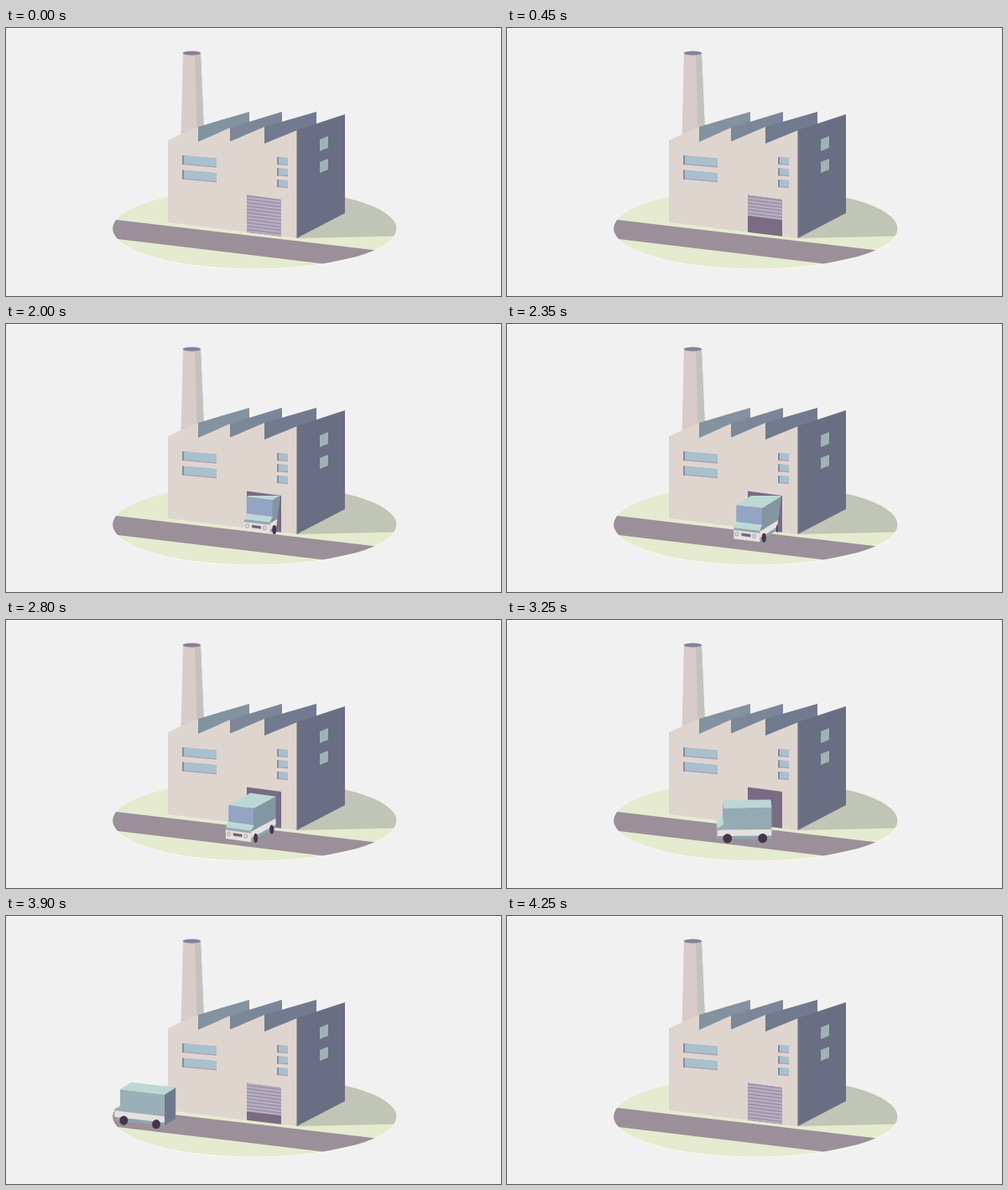
Write an HTML page that moves like this. It is 590 px wide and 320 px high and loops after 4550 ms.

```html
<!DOCTYPE html>
<html lang="en">
<head>
<meta charset="utf-8">
<title>Factory delivery</title>
<style>
  html, body { margin: 0; width: 100%; height: 100%; overflow: hidden; background: #f1f1f1; }
  svg { display: block; width: 590px; height: 320px; }
</style>
</head>
<body>
<svg viewBox="0 0 590 320">
  <defs>
    <clipPath id="island"><ellipse cx="296.3" cy="239.5" rx="169.2" ry="48"/></clipPath>
    <clipPath id="doorway"><path d="M287 199.5 328 205V248.7L287 243.8Z"/></clipPath>
    <clipPath id="leaving"><path d="M0 205H327L322.5 240V320H0Z"/></clipPath>
    <clipPath id="roadEnd"><path d="M127 0H590V320H127Z"/></clipPath>
  </defs>

  <ellipse cx="296.3" cy="239.8" rx="169.6" ry="48.5" fill="#fbfbf6"/>
  <g clip-path="url(#island)">
    <path d="M120 180H480V300H120Z" fill="#e5ebcf"/>
    <path d="M347 251 470 248.5V180H390Z" fill="#c1c5b5"/>
    <path d="M110 226.6 450 266.4 378 281.5 110 249.2Z" fill="#9b8f99"/>
  </g>

  <path d="M211 30H232L236 122 208.5 130Z" fill="#d8cccb"/>
  <path d="M225 30H232L236 122 227.5 124Z" fill="#c2c3be"/>
  <ellipse cx="221.5" cy="30" rx="10.7" ry="2.6" fill="#877f9a"/>

  <path d="M229 118 290 100V113L229 137Z" fill="#83929f"/>
  <path d="M267 119 329 100V113L267 136Z" fill="#7b8798"/>
  <path d="M308 118 370 100V116L308 139Z" fill="#717a8e"/>
  <path d="M193 134 229 118V136L267 119V135.5L308 118V138L347 122V251L193 232Z" fill="#dfd5cf"/>
  <path d="M346.5 122 404 103V221L346.5 251Z" fill="#696e82"/>
  <path d="M374 133 384 129V143L374 147ZM374 160 384 156V169L374 173Z" fill="#9fb2b4"/>
  <g id="windows"></g>

  <g clip-path="url(#doorway)">
    <path d="M280 190H340V260H280Z" fill="#7a6a83"/>
    <g id="shutter"></g>
  </g>
  <g clip-path="url(#roadEnd)"><g id="truck"></g></g>
</svg>
<script>
const LOOP = 4550, STEP = 50;
const HALF_LENGTH = 28.7, NOSE = 36, HALF_WIDTH = 17, ROOF = 42, TILT = 0.277;
const DOOR_HEIGHT = 44;

const byId = id => document.getElementById(id);
const clamp = v => Math.max(0, Math.min(1, v));
const progress = (t, from, to) => clamp((t - from) / (to - from));
const lerp = (a, b, k) => a + (b - a) * k;
const easeOut = u => 1 - Math.pow(1 - u, 1.4);
const sineOut = u => Math.sin(u * Math.PI / 2);
const sineInOut = u => (1 - Math.cos(u * Math.PI)) / 2;
const poly = (points, fill) =>
  `<polygon points="${points.map(p => p.map(v => v.toFixed(2)).join()).join(' ')}" fill="${fill}"/>`;
const slant = (x, y, w, h, drop, fill) =>
  poly([[x, y], [x + w, y + drop], [x + w, y + h + drop], [x, y + h]], fill);

function buildWindow(x, y, w, h, drop) {
  return slant(x, y, w, h, drop, '#a89fae') +
    slant(x, y, w, h - 1.3, drop, '#a9c0ce') +
    slant(x, y, 2, h, drop * 2 / w, '#878da4');
}

byId('windows').innerHTML =
  [152, 169.5].map(y => buildWindow(210, y, 41, 11, 3.7)).join('') +
  [154, 167.3, 181].map(y => buildWindow(323, y, 13, 9, 1)).join('');

let slats = slant(287, 199.5, 41, DOOR_HEIGHT, 5.2, '#b8b0c1');
for (let y = 0; y < DOOR_HEIGHT; y += 4) slats += slant(287, 199.5 + y, 41, 1.9, 5.2, '#9d93aa');
byId('shutter').innerHTML = slats;

// Ground position of the truck's centre and its heading in degrees (0 = facing left).
function truckPose(t) {
  const heading = lerp(66, -23, sineInOut(progress(t, 2700, 3550)));
  if (t <= 2800) {
    const k = sineOut(progress(t, 1750, 2800));
    return { x: lerp(325.9, 293.4, k), y: lerp(234.5, 257.8, k), heading };
  }
  if (t <= 3291) {
    const k = progress(t, 2800, 3291);
    return { x: lerp(293.4, 285.6, k), y: lerp(257.8, 261.5, sineOut(k)), heading };
  }
  const run = 3.14e-4 * (t - 3291) ** 2;
  return { x: 285.6 - run, y: 261.5 - run * 0.117, heading };
}

function drawTruck({ x, y, heading }) {
  const angle = heading * Math.PI / 180;
  const c = Math.cos(angle), s = Math.sin(angle);
  const at = (along, side, z) =>
    [x - along * c + side * s, y + TILT * (along * s + side * c) - z];
  const across = (along, left, right, low, high, fill) => poly(
    [at(along, left, high), at(along, right, high), at(along, right, low), at(along, left, low)], fill);
  const flank = (back, front, low, high, fill) => poly(
    [at(back, HALF_WIDTH, high), at(front, HALF_WIDTH, high),
     at(front, HALF_WIDTH, low), at(back, HALF_WIDTH, low)], fill);
  const W = HALF_WIDTH, L = HALF_LENGTH;
  const light = progress(heading, 66, -15);
  const sideFill = `rgb(${[[130, 153], [150, 176], [162, 183]].map(([a, b]) => Math.round(lerp(a, b, light)))})`;
  let out = '';

  if (s < 0) out += across(-L, -W, W, 5, ROOF, '#70788f');
  out += flank(-L, NOSE - 1, 4.5, 9, '#8ba5ad');
  if (s > 0) {
    out += across(L, -W, W, 20, ROOF, '#94a4c4');
    out += across(NOSE, -W, W, 13, 17, '#93a9b4');
    out += across(NOSE, -W, W, 3.5, 14, '#e6e1e1');
    out += across(NOSE, -7, 5, 8, 11.5, '#75667e');
    for (const side of [-13, 9.7]) {
      const [cx, cy] = at(NOSE, side, 9.7);
      out += `<ellipse cx="${cx}" cy="${cy}" rx="${2 * s}" ry="2.4" fill="#e9e4c8" stroke="#9b8f99" stroke-width=".9"/>`;
    }
  }
  out += poly([at(L, -W, 22), at(L, W, 22), at(NOSE, W, 17), at(NOSE, -W, 17)], '#bcd9d5');
  out += flank(-L, L, 16, ROOF, sideFill);
  out += poly([at(L, W, 22), at(NOSE, W, 17), at(NOSE, W, 15), at(L, W, 15)], sideFill);
  out += flank(-L, NOSE, 8.5, 16, '#e6e1df');
  out += poly([at(L, -W, ROOF), at(L, W, ROOF), at(-L, W, ROOF), at(-L, -W, ROOF)], '#bcd8d4');
  for (const along of [24, -18]) {
    const [cx, cy] = at(along, W, 5.5);
    out += `<ellipse cx="${cx}" cy="${cy}" rx="${Math.max(2.6, 5.4 * c)}" ry="5.6" fill="#43354a"/>`;
  }
  return out;
}

function render(t) {
  const open = t < 2500 ? easeOut(progress(t, 0, 1350)) : 1 - easeOut(progress(t, 3250, 4250));
  byId('shutter').setAttribute('transform', `translate(0 ${-open * (DOOR_HEIGHT + 1)})`);

  const truck = byId('truck');
  const visible = t >= 1750 && t < 4250;
  truck.innerHTML = visible ? drawTruck(truckPose(t)) : '';
  truck.setAttribute('opacity', progress(t, 1700, 1950));
  if (t < 2800) truck.setAttribute('clip-path', 'url(#leaving)');
  else truck.removeAttribute('clip-path');
}

const start = performance.now();
function tick() {
  const t = (performance.now() - start) % LOOP;
  render(Math.floor(t / STEP) * STEP);
  requestAnimationFrame(tick);
}
tick();
</script>
</body>
</html>
```
